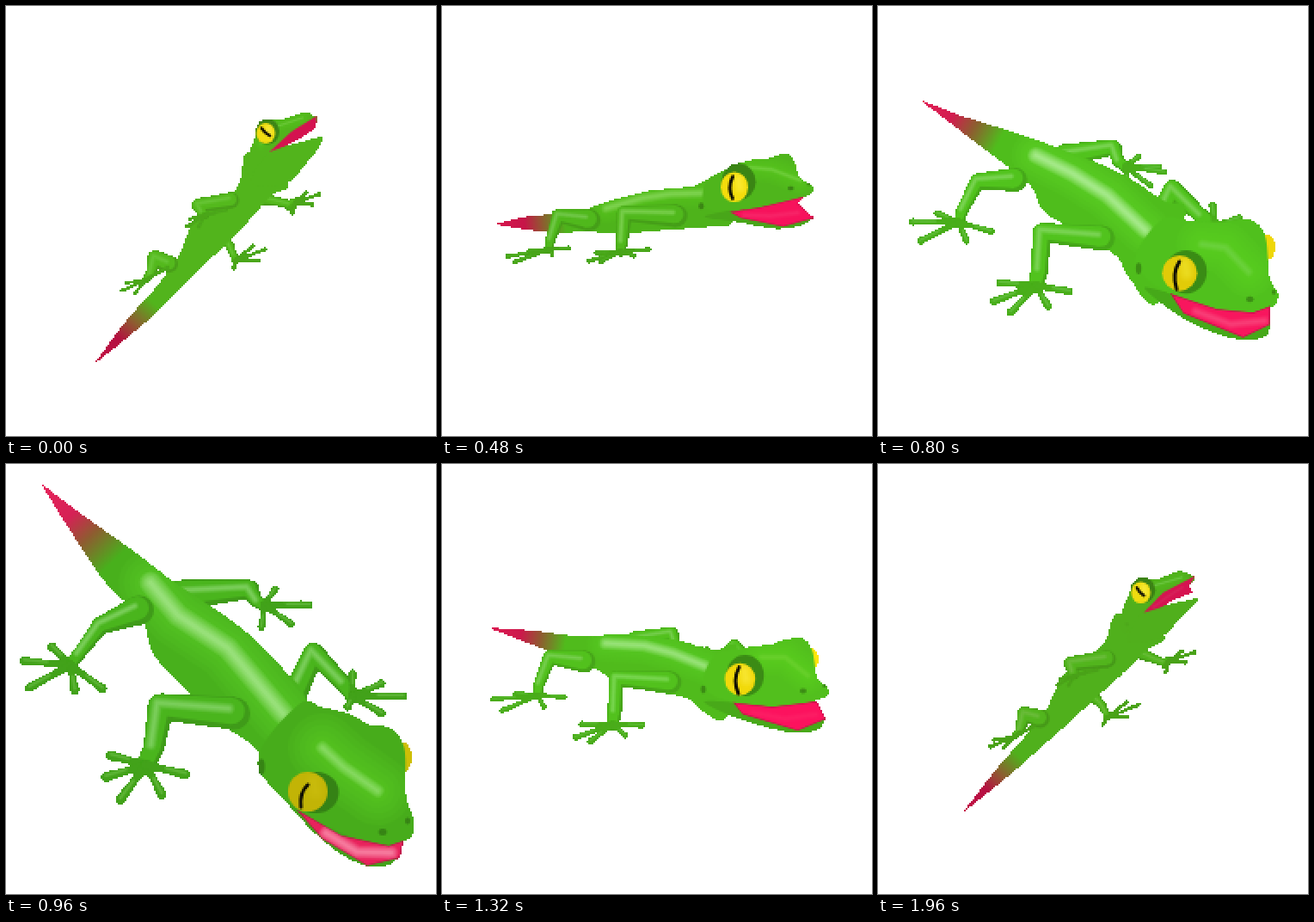
Write an HTML page with a canvas that moves like this. It is 500 px wide and 500 px high and loops after 2 s.

```html
<!DOCTYPE html>
<html lang="en">
<head>
<meta charset="utf-8">
<title>Rocking gecko</title>
<style>
  html, body { margin: 0; width: 100%; height: 100%; overflow: hidden; background: #fff; }
  canvas { display: block; width: 100%; height: 100%; image-rendering: pixelated; }
</style>
</head>
<body>
<canvas id="stage" width="250" height="250"></canvas>
<script>
const ctx = document.getElementById('stage').getContext('2d', { willReadFrequently: true });
const STEP = 40, RISE = 960, LOOP = 2000;

// Every shape lists four key views, from below to above.
const trunk = [
  [102,417, 140,366, 172,330, 200,292, 222,246, 268,212, 282,170, 328,207, 308,221, 282,250, 258,275, 222,309, 192,340, 155,374],
  [72,315, 105,294, 140,280, 182,256, 225,226, 265,206, 298,192, 345,212, 318,229, 285,246, 250,258, 208,276, 165,288, 115,307],
  [54,185, 100,189, 165,197, 205,196, 270,203, 318,217, 345,215, 330,298, 300,288, 288,275, 255,266, 205,254, 178,236, 130,216],
  [40,22, 100,67, 152,104, 195,137, 270,188, 322,238, 350,282, 330,380, 290,330, 255,305, 210,262, 172,222, 157,178, 112,133]
];
const tailEnd = [[168,343], [142,284], [144,203], [126,112]];
const skull = [
  [279,184, 289,155, 302,133, 320,132, 346,124, 353,125, 357,128, 362,130, 358,138, 335,152, 306,170, 284,196],
  [296,192, 316,167, 334,153, 357,157, 376,147, 387,151, 393,159, 410,170, 408,176, 372,191, 328,205, 305,215],
  [318,224, 350,217, 382,213, 400,207, 421,206, 432,220, 438,253, 451,267, 442,278, 400,286, 340,281, 304,262],
  [340,280, 368,283, 400,291, 425,304, 446,307, 463,330, 465,385, 475,418, 465,438, 420,440, 340,402, 293,345]
];
const jaw = [
  [306,168, 369,151, 365,163, 350,182, 325,207, 285,205],
  [328,204, 413,204, 395,210, 370,215, 335,216, 305,222],
  [340,281, 446,300, 438,314, 405,317, 350,302, 305,280],
  [338,400, 460,440, 450,464, 415,466, 370,439, 325,392]
];
const mouth = [
  [306,170, 332,146, 361,128, 361,136, 359,143, 342,154, 324,163],
  [328,208, 350,194, 410,175, 389,192, 413,204, 375,210, 345,210],
  [339,281, 385,287, 430,282, 438,281, 447,301, 415,315, 350,295],
  [338,402, 390,432, 445,444, 462,438, 458,458, 420,467, 368,436]
];
const tongue = [
  [318,164, 335,152, 352,138],
  [340,205, 362,200, 388,197],
  [362,293, 400,301, 436,296],
  [372,429, 408,451, 448,452]
];
const spine = [
  [200,310, 225,280, 255,250, 285,210],
  [190,262, 225,238, 260,220, 300,206],
  [190,206, 235,210, 268,220, 305,236],
  [168,138, 200,176, 258,214, 322,290]
];
const crown = [
  [296,160, 315,140, 345,130],
  [338,160, 362,165, 400,167],
  [372,228, 400,228, 426,250],
  [368,330, 392,352, 432,380]
];
const eye = [[302,148,11,12], [330,179,14,16], [347,254,18,19], [351,381,23,23]];
const socket = [[304,146,14,15], [334,172,18,18], [353,250,22,24], [361,382,26,24]];
const farEye = [[335,140,5,6], [375,160,7,8], [432,230,8,12], [460,341,12,18]];
const pupil = [
  [297,142, 301,148, 307,151],
  [327,170, 323,179, 328,188],
  [346,240, 338,255, 345,271],
  [351,373, 341,382, 343,399]
];
const ear = [[289,186,2,2], [297,208,3,3], [304,265,3,5], [297,352,4,9]];
const nostril = [[354,128,1,1], [388,170,3,2], [421,269,4,3], [438,428,5,4]];
const nostril2 = [[358,129,1,1], [404,165,2,2], [446,263,2,2], [467,415,3,4]];

// Bones hold x, y, radius per joint; toes hold only their tips.
const backNear = {
  bones: [
    [190,300,10, 174,293,9, 168,312,5, 162,319,4],
    [178,267,13, 148,264,8, 140,288,5, 137,297,4],
    [165,228,13, 125,223,8, 112,255,6, 110,268,5],
    [155,170,17, 110,188,10, 84,222,7, 75,234,7]
  ],
  toes: [
    [150,334, 135,331, 139,322, 170,314, 188,304],
    [118,302, 94,308, 101,308, 138,297, 155,293],
    [85,265, 58,272, 68,286, 118,282, 142,270],
    [53,212, 21,229, 27,260, 80,263, 112,261]
  ],
  size: [2.2, 2.2, 3.2, 5]
};
const frontNear = {
  bones: [
    [262,226,9, 224,232,8, 228,240,6, 231,243,5],
    [278,236,13, 220,236,9, 217,262,6, 215,270,4],
    [265,255,13, 202,250,9, 200,290,8, 198,304,7],
    [265,290,19, 180,282,15, 172,330,12, 163,350,11]
  ],
  toes: [
    [224,257, 210,257, 213,248, 242,241, 256,237],
    [197,272, 187,276, 195,275, 232,268, 247,264],
    [161,304, 153,320, 171,325, 212,318, 233,306],
    [122,339, 116,364, 133,390, 181,384, 209,361]
  ],
  size: [2.2, 2.2, 3.6, 5.5]
};
const frontFar = {
  bones: [
    [298,224,7, 318,228,5, 330,231,5, 337,228,5],
    [330,212,7, 345,222,5, 350,232,5, 352,236,4],
    [325,235,10, 340,212,8, 365,238,8, 378,246,7],
    [335,270,14, 358,220,12, 392,255,9, 403,270,8]
  ],
  toes: [
    [333,241, 356,231, 364,219, 349,217, 329,236],
    [350,240, 378,232, 398,227, 380,231, 352,239],
    [375,230, 405,240, 425,250, 400,262, 372,256],
    [403,243, 437,255, 462,270, 437,290, 397,283]
  ],
  size: [2.4, 2.2, 3.5, 4.6]
};
const backFar = {
  bones: [
    [255,272,6, 260,278,5, 265,290,4, 267,296,4],
    [240,255,6, 262,258,5, 266,264,4, 267,268,3],
    [225,202,10, 268,194,7, 272,208,6, 278,214,5],
    [205,152,17, 283,146,11, 292,160,7, 300,164,7]
  ],
  toes: [
    [265,305, 293,296, 301,283, 287,279, 282,290],
    [260,270, 285,264, 312,254, 300,258, 265,269],
    [288,208, 310,214, 321,217, 308,228, 280,230],
    [313,145, 344,163, 353,164, 332,186, 297,190]
  ],
  size: [2.4, 2, 3, 4]
};

const skin = [[82,180,28], [76,170,27], [80,188,28], [72,176,28]];
const pinkTail = [[196,16,70], [208,20,76], [222,26,82], [232,36,92]];
const pinkMouth = [[212,18,80], [236,20,88], [252,18,94], [232,34,92]];
const iris = [[240,220,16], [242,222,14], [240,216,10], [194,180,6]];

let weights = [1, 0, 0, 0];

// Cubic weights through views 0..3.
function setView(p) {
  weights = [0, 1, 2, 3].map(i => [0, 1, 2, 3].reduce(
    (w, j) => j === i ? w : w * (p - j) / (i - j), 1));
}
const num = keys => keys.reduce((sum, k, i) => sum + weights[i] * k, 0);
const at = shape => shape[0].map((_, n) => num(shape.map(view => view[n])));
const level = keys => Math.min(1, Math.max(0, num(keys)));
const rgb = (c, k = 1) => `rgb(${c.map(v => Math.round(Math.min(255, Math.max(0, v * k)))).join()})`;
const pairs = flat => Array.from({ length: flat.length / 2 }, (_, i) => [flat[2 * i], flat[2 * i + 1]]);

function smooth(flat, sharp = []) {
  const pts = pairs(flat), n = pts.length;
  const tangent = i => {
    if (sharp.includes(i)) return [0, 0];
    const a = pts[(i + n - 1) % n], b = pts[(i + 1) % n];
    return [(b[0] - a[0]) / 6, (b[1] - a[1]) / 6];
  };
  const path = new Path2D();
  path.moveTo(...pts[0]);
  for (let i = 0; i < n; i++) {
    const j = (i + 1) % n, s = tangent(i), e = tangent(j);
    path.bezierCurveTo(pts[i][0] + s[0], pts[i][1] + s[1],
      pts[j][0] - e[0], pts[j][1] - e[1], ...pts[j]);
  }
  path.closePath();
  return path;
}

function lines(flat, closed) {
  const path = new Path2D();
  pairs(flat).forEach(p => path.lineTo(...p));
  if (closed) path.closePath();
  return path;
}

function fill(path, color) {
  ctx.fillStyle = color;
  ctx.fill(path);
}

function oval([x, y, rx, ry], color) {
  const path = new Path2D();
  path.ellipse(x, y, Math.max(0.5, rx), Math.max(0.5, ry), 0, 0, 2 * Math.PI);
  fill(path, color);
  return path;
}

// Soft band built from stacked strokes.
function glow(path, width, color, alpha) {
  if (alpha < 0.01) return;
  const layers = 6;
  ctx.save();
  ctx.strokeStyle = color;
  ctx.lineCap = ctx.lineJoin = 'round';
  ctx.globalAlpha = alpha / layers;
  for (let i = 1; i <= layers; i++) {
    ctx.lineWidth = width * i / layers;
    ctx.stroke(path);
  }
  ctx.restore();
}

function inside(path, draw) {
  ctx.save();
  ctx.clip(path);
  draw();
  ctx.restore();
}

// Tapered tube through x, y, radius joints.
function tube(joints, color, k = 1, lift = 0) {
  ctx.fillStyle = color;
  const list = [];
  for (let i = 0; i < joints.length; i += 3) {
    const r = Math.max(1, joints[i + 2]);
    list.push([joints[i] - r * lift, joints[i + 1] - r * lift, r * k]);
  }
  list.forEach(([x, y, r], i) => {
    ctx.beginPath();
    ctx.arc(x, y, r, 0, 2 * Math.PI);
    ctx.fill();
    if (!i) return;
    const [px, py, pr] = list[i - 1];
    const a = Math.atan2(y - py, x - px) + Math.PI / 2, c = Math.cos(a), s = Math.sin(a);
    ctx.beginPath();
    ctx.moveTo(px + c * pr, py + s * pr);
    ctx.lineTo(x + c * r, y + s * r);
    ctx.lineTo(x - c * r, y - s * r);
    ctx.lineTo(px - c * pr, py - s * pr);
    ctx.fill();
  });
}

function limb({ bones, toes, size }, base) {
  const joints = at(bones), r = num(size);
  const [px, py] = joints.slice(-3);
  tube(joints, rgb(base, 0.88));
  tube(joints, rgb(base, 1.03), 0.8, 0.14);
  const shine = joints.slice(0, 9).filter((_, i) => i % 3 < 2)
    .map((v, i) => v - joints[3 * (i >> 1) + 2] * 0.3);
  glow(lines(shine), joints[5] * 0.9, '#c4f2b4', level([0.2, 0.35, 0.4, 0.5]));
  pairs(at(toes)).forEach(([x, y]) => {
    const mx = (px + x) / 2, my = (py + y) / 2;
    tube([px, py, r, mx, my, r * 0.75, x, y, r], rgb(base, 0.92));
    glow(lines([mx, my - r * 0.3, x, y - r * 0.3]), r, '#8ee070', level([0.1, 0.1, 0.4, 0.5]));
  });
}

function drawTrunk(base) {
  const flat = at(trunk), path = smooth(flat, [0]);
  const paint = ctx.createLinearGradient(flat[0], flat[1], ...at(tailEnd));
  const pink = at(pinkTail);
  paint.addColorStop(0, rgb(pink));
  paint.addColorStop(0.42, rgb(pink, 0.92));
  paint.addColorStop(0.68, 'rgb(142,92,48)');
  paint.addColorStop(1, rgb(base));
  fill(path, paint);
  inside(path, () => {
    const line = lines(at(spine)), size = num([30, 30, 44, 74]);
    glow(line, size, '#62d42c', level([0, 0.1, 0.6, 0.7]));
    glow(line, size * 0.35, '#e0ffd8', level([0, 0, 0.6, 0.6]));
  });
}

function drawHead(base) {
  fill(smooth(at(jaw), [0, 1]), rgb(base, num([1, 0.96, 0.9, 0.92])));
  const top = smooth(at(skull));
  fill(top, rgb(base, num([1, 1, 1.02, 0.98])));
  inside(top, () => {
    const line = lines(at(crown)), size = num([16, 24, 44, 80]);
    glow(line, size, '#5ed026', level([0.2, 0.3, 0.6, 0.7]));
    glow(line, size * 0.2, '#d0f8c4', level([0.2, 0.3, 0.1, 0.45]));
  });

  const gape = lines(at(mouth), true);
  fill(gape, rgb(at(pinkMouth)));
  inside(gape, () => {
    glow(lines(at(tongue)), num([4, 8, 10, 16]), '#ffc0cc', level([0, 0.15, 0.05, 0.75]));
    ctx.strokeStyle = `rgba(130,10,50,${level([0, 0.3, 0.45, 0.5])})`;
    ctx.lineWidth = 2;
    ctx.stroke(gape);
  });

  const dark = rgb(base, 0.72);
  ctx.globalAlpha = level([0, 0.8, 0.9, 0.9]);
  [ear, nostril, nostril2].forEach(spot => oval(at(spot), dark));
  ctx.globalAlpha = 1;

  oval(at(socket), rgb(base, 0.74));
  const ball = at(eye), round = oval(ball, rgb(at(iris)));
  inside(round, () => {
    const [x, y, rx, ry] = ball;
    glow(lines([x + rx * 0.3, y - ry * 0.5, x + rx * 0.4, y]), rx, '#fff45a', level([0.6, 0.6, 0.5, 0.1]));
  });
  const slit = at(pupil), curve = new Path2D();
  curve.moveTo(slit[0], slit[1]);
  curve.quadraticCurveTo(...slit.slice(2));
  ctx.strokeStyle = '#0c0c04';
  ctx.lineWidth = num([3.2, 3.8, 4, 4]);
  ctx.lineCap = 'round';
  ctx.stroke(curve);
}

// Keep the outline hard-edged.
function harden() {
  const image = ctx.getImageData(0, 0, 250, 250), d = image.data;
  for (let i = 3; i < d.length; i += 4) d[i] = d[i] < 128 ? 0 : 255;
  ctx.putImageData(image, 0, 0);
}

function draw(time) {
  const lift = time <= RISE ? time / RISE : (LOOP - time) / (LOOP - RISE);
  setView(3 * lift);
  const base = at(skin);
  ctx.setTransform(1, 0, 0, 1, 0, 0);
  ctx.clearRect(0, 0, 250, 250);
  ctx.scale(0.5, 0.5);
  limb(backFar, base);
  limb(frontFar, base);
  oval(at(farEye), rgb(at(iris), 1.06));
  drawTrunk(base);
  drawHead(base);
  limb(backNear, base);
  limb(frontNear, base);
  harden();
}

let shown = -1;
function tick() {
  const time = Math.floor(performance.now() % LOOP / STEP) * STEP;
  if (time !== shown) draw(shown = time);
  requestAnimationFrame(tick);
}
tick();
</script>
</body>
</html>
```
